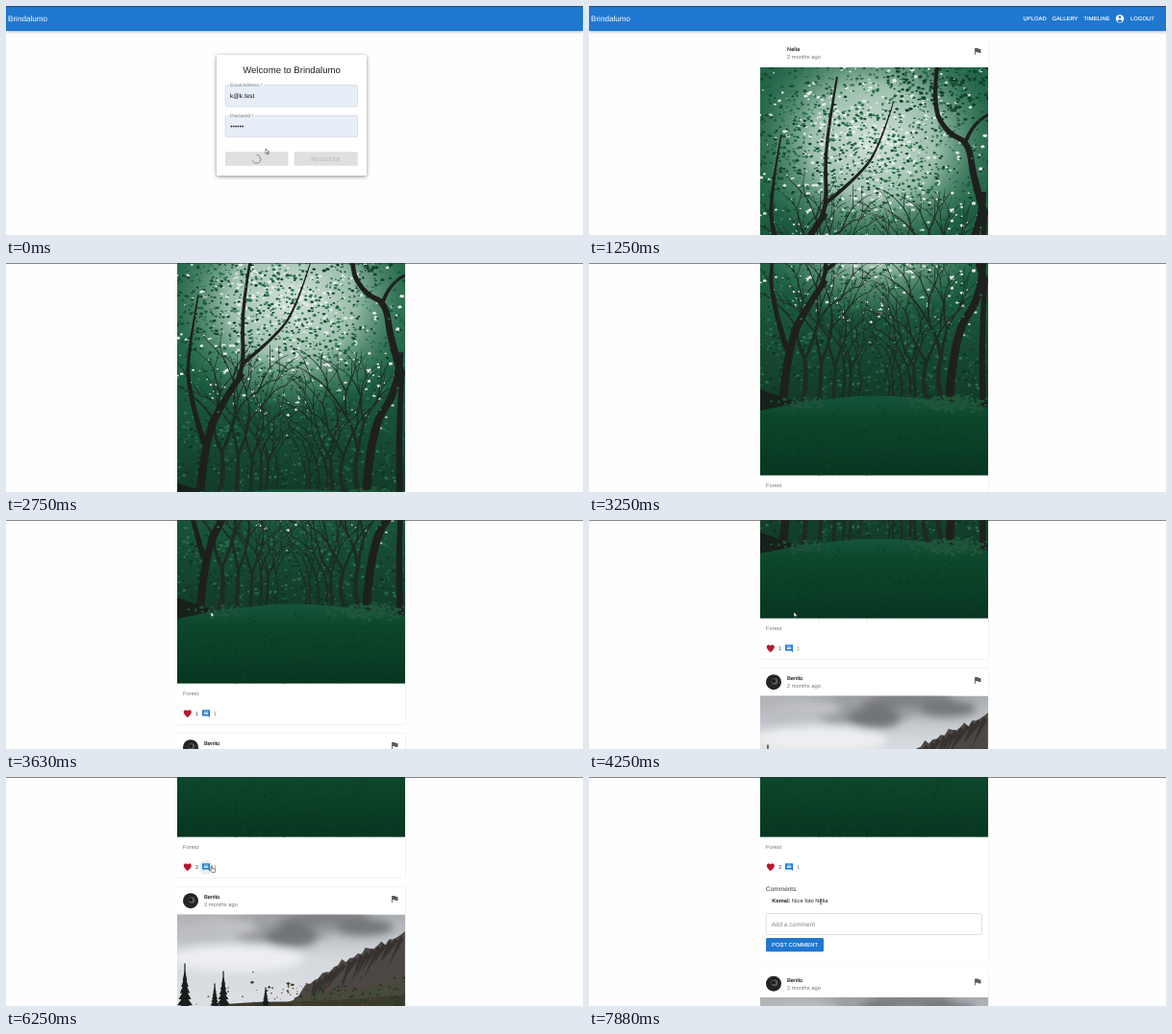
An HTML page for the animation above (8000 ms loop, 600 by 239 pixels).

```html
<!DOCTYPE html>
<html lang="en">
<head>
<meta charset="utf-8">
<title>Photo timeline</title>
<style>
html, body { margin: 0; width: 100%; height: 100%; overflow: hidden; background: #fefefe; }
svg { display: block; width: 600px; height: 239px; }
text { font-family: "Liberation Sans", Arial, sans-serif; font-size: 5.75px; text-rendering: geometricPrecision; white-space: pre; }
.paper { filter: drop-shadow(0 .7px .6px rgba(0,0,0,.2)); }
.raised { filter: drop-shadow(0 1.2px 2.2px rgba(0,0,0,.45)); }
.bar { filter: drop-shadow(0 1px 1.4px rgba(0,0,0,.28)); }
.medium { stroke: currentColor; stroke-width: .14px; }
</style>
</head>
<body>
<svg id="stage" viewBox="0 0 600 239"></svg>
<script>
const LOOP = 8000, STEP = 125, BLUE = '#1f77d0';
const APP = 'Brindalumo', POSTER = 'Nelia', SECOND = 'Benito', FAN = 'Kemal';
const PHOTO_W = 237, PHOTO_H = 355.5;

let seed = 71;
const rnd = () => (seed = (seed * 16807) % 2147483647) / 2147483647;
const spread = () => (rnd() + rnd() + rnd() - 1.5) * 2;
const n1 = v => v.toFixed(1);
const times = (n, f) => Array.from({ length: n }, (_, i) => f(i)).join('');

const rect = (x, y, w, h, fill, more = '') =>
  `<rect x="${x}" y="${y}" width="${w}" height="${h}" fill="${fill}" ${more}/>`;
const ellipse = (x, y, rx, ry, fill, more = '') =>
  `<ellipse cx="${x}" cy="${y}" rx="${rx}" ry="${ry}" fill="${fill}" ${more}/>`;
const circle = (x, y, r, fill, more) => ellipse(x, y, r, r, fill, more);
const path = (d, fill, more = '') => `<path d="${d}" fill="${fill}" ${more}/>`;
const text = (x, y, s, fill = '#333', more = '') => `<text x="${x}" y="${y}" fill="${fill}" ${more}>${s}</text>`;
const at = (x, y, body) => `<g transform="translate(${x} ${y})">${body}</g>`;
const size = px => `style="font-size:${px}px"`;
const MID = 'text-anchor="middle" ';
const stops = list => list.map(([o, c]) => `<stop offset="${o}" stop-color="${c}"/>`).join('');
const fade = (id, ...list) => `<linearGradient id="${id}" x1="0" y1="0" x2="0" y2="1">${stops(list)}</linearGradient>`;

// Scattered small leaf shapes joined into one path
function leaves(count, fill, x, y, w, h, big = 3) {
  return path(times(count, () => {
    const s = big * (.4 + rnd() * .7), a = rnd() * 6.3;
    const p = k => n1(s * Math.cos(a + k)) + ' ' + n1(s * .7 * Math.sin(a + k));
    return `M${n1(x + spread() * w)} ${n1(y + spread() * h)}l${p(0)}l${p(1.7)}l${p(3.3)}z`;
  }), fill);
}

// Tapered limb through a few points
function limb(w0, w1, ...pts) {
  const last = pts.length - 1;
  const side = k => pts.map((p, i) => {
    const a = pts[Math.max(0, i - 1)], b = pts[Math.min(last, i + 1)];
    const dx = b[0] - a[0], dy = b[1] - a[1];
    const w = k * (w0 + (w1 - w0) * i / last) / 2 / Math.hypot(dx, dy);
    return [p[0] - dy * w, p[1] + dx * w];
  });
  const curve = q => q.slice(1, -1).reduce((d, [x, y], i) => {
    const [ex, ey] = q[i + 2], k = i + 2 === last ? 1 : .5;
    return d + `Q${n1(x)} ${n1(y)} ${n1(x + (ex - x) * k)} ${n1(y + (ey - y) * k)}`;
  }, `${n1(q[0][0])} ${n1(q[0][1])}`);
  return 'M' + curve(side(1)) + 'L' + curve(side(-1).reverse()) + 'z';
}

// A tree that forks upwards until its twigs are thin
function grow(x, y, lean, len, w) {
  if (w < .55) return '';
  const mx = x + Math.sin(lean + spread() * .2) * len / 2, my = y - len / 2;
  const ex = x + Math.sin(lean) * len, ey = y - Math.cos(lean) * len;
  const fork = .2 + rnd() * .3;
  return limb(w, w * .72, [x, y], [mx, my], [ex, ey]) +
    grow(ex, ey, lean - fork, len * (.7 + rnd() * .25), w * .64) +
    grow(ex, ey, lean + fork, len * (.7 + rnd() * .25), w * .6);
}

function forest() {
  // Two rows of trunks closing in on the middle of the lawn
  const avenue = times(14, i => {
    const far = .78 ** (1 + (i >> 1)), dir = i % 2 ? 1 : -1;
    return grow(118 + dir * 92 * far + spread() * 2, 272 + 10 * far, dir * -.05, 22 + 30 * far, 1 + 6 * far);
  });
  const bigTrees =
    limb(2, 6, [80, 10], [73, 50], [67, 100], [70, 150], [47, 181], [34, 206]) +
    limb(6, 9, [68, 152], [47, 181], [28, 225], [23, 286]) +
    limb(1, 4, [139, 35], [125, 80], [105, 112], [68, 142]) +
    limb(1.5, 6, [22, 70], [11, 130], [12, 175], [28, 225]) +
    limb(4, 8, [184, 0], [179, 42], [196, 70], [217, 78], [222, 118], [234, 155]) +
    limb(7, 9, [232, 130], [230, 170], [201, 208], [196, 284]) +
    limb(3, 4, [238, 49], [220, 58], [213, 80]) +
    limb(5, 7, [234, 150], [229, 215], [232, 284]);
  return rect(0, 0, PHOTO_W, PHOTO_H, 'url(#wood)') +
    rect(0, 0, PHOTO_W, 215, 'url(#light)') +
    leaves(420, '#e4ece8', 112, 78, 55, 45, 4) +
    leaves(120, '#cfdcd5', 120, 165, 100, 20, 3.4) +
    leaves(1100, '#2c7350', 118, 85, 105, 85, 3.4) +
    leaves(1000, '#1c5a3b', 118, 110, 110, 95, 3.4) +
    leaves(420, '#0e3a25', 118, 125, 115, 110, 3) +
    leaves(220, '#12402a', 200, 16, 32, 20, 4) +
    leaves(220, '#14492f', 18, 60, 26, 60, 3.4) +
    leaves(240, '#2b6a4a', 118, 215, 70, 28, 3.4) +
    leaves(260, '#0f3524', 118, 246, 105, 22, 4) +
    path(avenue, '#1d2b23') + path(bigTrees, '#1e201d') +
    leaves(300, '#2b7650', 118, 80, 100, 65, 2.6) +
    path('M0 284Q60 277 100 273H140Q190 276 237 285V356H0z', 'url(#lawn)') +
    path('M0 266L40 280 0 288z', '#17211a') +
    leaves(150, '#1f5538', 199, 280, 20, 4, 4.5) +
    leaves(50, '#20513a', 45, 281, 12, 2.5, 4) +
    leaves(400, '#0f4a2e', 118, 318, 115, 24, 1.6) +
    leaves(300, '#08331e', 118, 330, 115, 22, 1.8);
}

function fir(x, y, h) {
  return `M${x - .6} ${y}h1.2v${h}h-1.2z` + times(8, i => {
    const w = 1 + i * h * .024;
    return `M${x} ${n1(y + i * h / 9)}l${n1(w)} ${n1(h / 5)}h${n1(-2 * w)}z`;
  });
}

function peaks() {
  const ridge = x => 96 - 77 * Math.max(0, (x - 118) / 119) ** .65;
  const clouds = times(22, () => {
    const x = rnd() * 250, y = rnd() * 24, tone = Math.round(178 - x * .28 + spread() * 16);
    return ellipse(n1(x), n1(y), n1(22 + rnd() * 24), n1(4 + rnd() * 7), `rgb(${tone},${tone + 2},${tone + 6})`);
  });
  const slope = times(30, i => `L${118 + i * 4.1} ${n1(ridge(118 + i * 4.1) + spread() * 1.6)}`);
  const gullies = times(16, i => {
    const x = 142 + i * 6, y = ridge(x) + 1;
    return `M${x} ${n1(y)}l4 3l${n1(-10 - rnd() * 9)} ${n1(18 + rnd() * 16)}z`;
  });
  return rect(0, 0, PHOTO_W, 158, 'url(#sky)') +
    `<g filter="url(#haze)">${ellipse(62, 46, 70, 14, '#eceef1')}${clouds}</g>` +
    path('M118 96' + slope + 'V158H118z', '#4c4743') + path(gullies, '#37322f') +
    path('M110 93Q150 79 180 78T237 66V158H100z', '#454a3a') +
    path('M0 101Q50 91 105 91T237 84V158H0z', '#393c2c') +
    leaves(130, '#6d3f2c', 176, 88, 60, 8, 2) + leaves(110, '#2b3527', 185, 84, 54, 10, 3) +
    path(fir(8, 51, 58) + fir(48, 59, 46) + fir(39, 72, 30) + fir(92, 76, 24), '#191d1b');
}

const heart = path('M0 4.2C-3.4 1.2-4-.1-4-1.4-4-4.1-1-4.4 0-2.8 1-4.4 4-4.1 4-1.4 4-.1 3.4 1.2 0 4.2z', '#b8172b');
const note = path('M-4-4H4V4L2.4 2.4H-4z', '#1976d2') + times(3, i => rect(-2.4, -2.5 + i * 1.3, 4.8, .7, '#fff'));
const flag = path('M-3.2-3.4H.6l.2.8H3.2V1.6H.6L.4.8H-2.4V3.4h-.8z', '#5c5c5c');

const head = (y, name, face) => face + text(206, y + 11, name, '#222', 'class="medium" color="#222"') +
  text(206, y + 19, '2 months ago', '#777') + at(404.3, y + 11.5, flag);

const field = (y, label, gap) => rect(228, y, 137.5, 22.5, '#e8eef7', 'rx="1.6" stroke="#bccbdc" stroke-width=".5"') +
  rect(232, y - 1, gap, 1.3, '#fff') + text(233, y + 1.8, label, '#777', size(4.8));

const login = rect(219, 51, 156, 126, '#fff', 'class="raised" rx="1.6"') +
  text(297, 70, 'Welcome to ' + APP, '#222', MID + size(9.6)) +
  field(82.5, 'Email Address *', 36) + text(233, 96.2, 'k@k.test', '#111', size(6.5)) +
  field(114.3, 'Password *', 27) + times(6, i => circle(234.4 + i * 2.35, 125.6, .85, '#111')) +
  rect(228, 152.3, 65.5, 14.5, '#dfdfdf', 'rx="1.6"') + rect(299.5, 152.3, 66.3, 14.5, '#dfdfdf', 'rx="1.6"') +
  text(332.6, 161.7, 'REGISTER', '#b3b3b3', MID + 'letter-spacing=".16"') +
  '<path id="spin" d="M0-4.4A4.4 4.4 0 1 1-4.2 1.4" fill="none" stroke="#8d8d8d" stroke-width="1"/>';

const link = (x, s) => text(x, 15.3, s, '#fff', 'class="medium" color="#fff" letter-spacing=".08"');
const links = link(451.5, 'UPLOAD') + link(481.5, 'GALLERY') + link(514.5, 'TIMELINE') + link(563, 'LOGOUT') +
  circle(552, 13.2, 4.2, '#fff') + circle(552, 11.7, 1.35, BLUE) + path('M549.4 15.4q2.6-2.4 5.2 0q-2.6 3-5.2 0z', BLUE);

const comments = text(184, 476, 'Comments', '#333', size(6.5)) +
  text(190.3, 487.8, `<tspan font-weight="bold">${FAN}:</tspan> Nice foto ${POSTER}`, '#222') +
  rect(184.3, 499.5, 224.3, 22, '#fff', 'rx="1.6" stroke="#c8c8c8" stroke-width=".6"') +
  text(189.5, 512.8, 'Add a comment', '#868686', size(6.5)) +
  rect(184, 525, 60, 14.3, BLUE, 'class="paper" rx="1.6"') +
  text(214, 534.2, 'POST COMMENT', '#fff', MID + 'letter-spacing=".1" class="medium" color="#fff"');

const faceOne = '<g id="face">' + circle(192, 49.2, 8, '#6f6a45') + circle(192.4, 49.5, 5.8, '#3c2726') +
  ellipse(192, 53, 3.6, 2.6, '#b08d80') + circle(192, 47.6, 2.2, '#8b5f52') + '</g>';
const faceTwo = circle(192, 486.2, 8, '#222426') + circle(193, 485.4, 3.4, '#55595b') + circle(192, 485, 2, '#191b1c');

const clip = (id, box) => `<clipPath id="${id}">${box}</clipPath>`;
const photo = (y, id, body) => at(178, y, `<g clip-path="url(#${id})">${body}</g>`);
const cursor = (id, d, fill) => `<g id="${id}">${path(d, fill, 'stroke="#222" stroke-width=".55"')}</g>`;

const stage = document.getElementById('stage');
stage.innerHTML = '<defs>' +
  fade('wood', [0, '#24664a'], [.4, '#1f6244'], [.62, '#164a33'], [.8, '#123a28']) +
  fade('lawn', [0, '#15553a'], [.25, '#0d472c'], [1, '#083620']) +
  fade('sky', [0, '#a9acb1'], [.3, '#d5d8dd'], [.65, '#dde0e5']) +
  `<radialGradient id="light" cx=".5" cy=".36" r=".55">${stops([[0, '#d3e2d9'], [.5, '#9dbfac']])}` +
  '<stop offset="1" stop-color="#4a8768" stop-opacity="0"/></radialGradient>' +
  '<filter id="haze"><feGaussianBlur stdDeviation="4"/></filter>' +
  clip('tall', rect(0, 0, PHOTO_W, PHOTO_H)) + clip('wide', rect(0, 0, PHOTO_W, 158)) +
  clip('fold', rect(178, 462, 237.5, 0, '#000', 'id="foldBox"')) + '</defs>' +
  rect(0, 0, 600, 239, '#fefefe') +
  '<g id="page"><g id="feed">' +
  rect(178, 36, 237.5, 426.5, '#fff', 'id="card" class="paper" rx="1.6"') + head(36, POSTER, faceOne) +
  photo(64, 'tall', forest()) + text(184, 432, 'Forest', '#777') +
  circle(208, 451.3, 7.5, '#e9edf2', 'id="glow"') + at(188.8, 451, heart) + at(208, 451.2, note) +
  text(197, 453.4, '1', '#444', 'id="likes"') + text(216, 453.4, '1', '#888') +
  `<g clip-path="url(#fold)">${comments}</g>` +
  '<g id="next">' + rect(178, 471.5, 237.5, 240, '#fff', 'class="paper" rx="1.6"') + head(473, SECOND, faceTwo) +
  photo(500.5, 'wide', peaks()) + '</g></g>' +
  rect(0, 0, 600, 26, BLUE, 'class="bar"') + text(2, 16, APP, '#fff', size(8.1)) + `<g id="links">${links}</g></g>` +
  `<g id="login">${login}</g>` + rect(0, 0, 600, 1, 'rgba(40,40,40,.55)') +
  cursor('arrow', 'M0 0V5.2L1.3 4.1 2.1 6 3 5.6 2.2 3.8H3.8z', '#fff') +
  cursor('hand', 'M-.6 0q.7-.8 1.2 0V2.4l2.5.5q.8.3.6 1.3L3.2 6.6H.2L-1.9 4q.4-.9 1.3-.1z', '#fff') +
  cursor('beam', 'M-1.2-2.8Q0-2.8 0-2V2Q0 2.8-1.2 2.8M1.2-2.8Q0-2.8 0-2M0 2Q0 2.8 1.2 2.8', 'none');

const el = {};
stage.querySelectorAll('[id]').forEach(e => el[e.id] = e);
const show = (e, on) => e.setAttribute('display', on ? 'inline' : 'none');
const move = (e, x, y, more = '') => e.setAttribute('transform', `translate(${x} ${y})${more}`);
const part = (t, from, to) => Math.min(1, Math.max(0, (t - from) / (to - from)));
const ease = k => k * k * (3 - 2 * k);

const scroll = t => 28 * part(t, 1625, 2375) + 170 * part(t, 2375, 3250) +
  119 * part(t, 3250, 4125) + 40 * part(t, 4250, 5000);

// Pointer: to the heart, to the comment icon, away, then onto the comment
function pointer(t) {
  const like = part(t, 5125, 5500), note = part(t, 5875, 6250), away = part(t, 7125, 7500), back = part(t, 7625, 7875);
  return [213 - 24 * like + 25 * note + 113 * away - 86 * back, 96 - 3 * like - 69 * away + 106 * back];
}

function draw(t) {
  const inside = t >= 500, hand = t >= 5375 && t < 7125, beam = t >= 7875;
  show(el.login, !inside);
  show(el.links, inside);
  show(el.feed, t >= 1000);
  show(el.face, t >= 1375);
  move(el.spin, 260.5, 159.7, ` rotate(${t * .26})`);
  move(el.page, 0, -scroll(t));

  const open = 86.5 * ease(part(t, 6875, 7250));
  el.foldBox.setAttribute('height', open);
  el.card.setAttribute('height', 426.5 + open);
  move(el.next, 0, open);
  el.likes.textContent = t >= 5625 ? 2 : 1;
  show(el.glow, t >= 6125 && t < 7125);

  const [x, y] = inside ? pointer(t) : [270, 149];
  show(el.arrow, !inside || t >= 3500 && !hand && !beam);
  show(el.hand, hand);
  show(el.beam, beam);
  [el.arrow, el.hand, el.beam].forEach(e => move(e, x, y));
}

const start = performance.now();
let shown = -1;
function tick() {
  const t = Math.floor((performance.now() - start) % LOOP / STEP) * STEP;
  if (t !== shown) draw(shown = t);
  requestAnimationFrame(tick);
}
tick();
</script>
</body>
</html>
```
